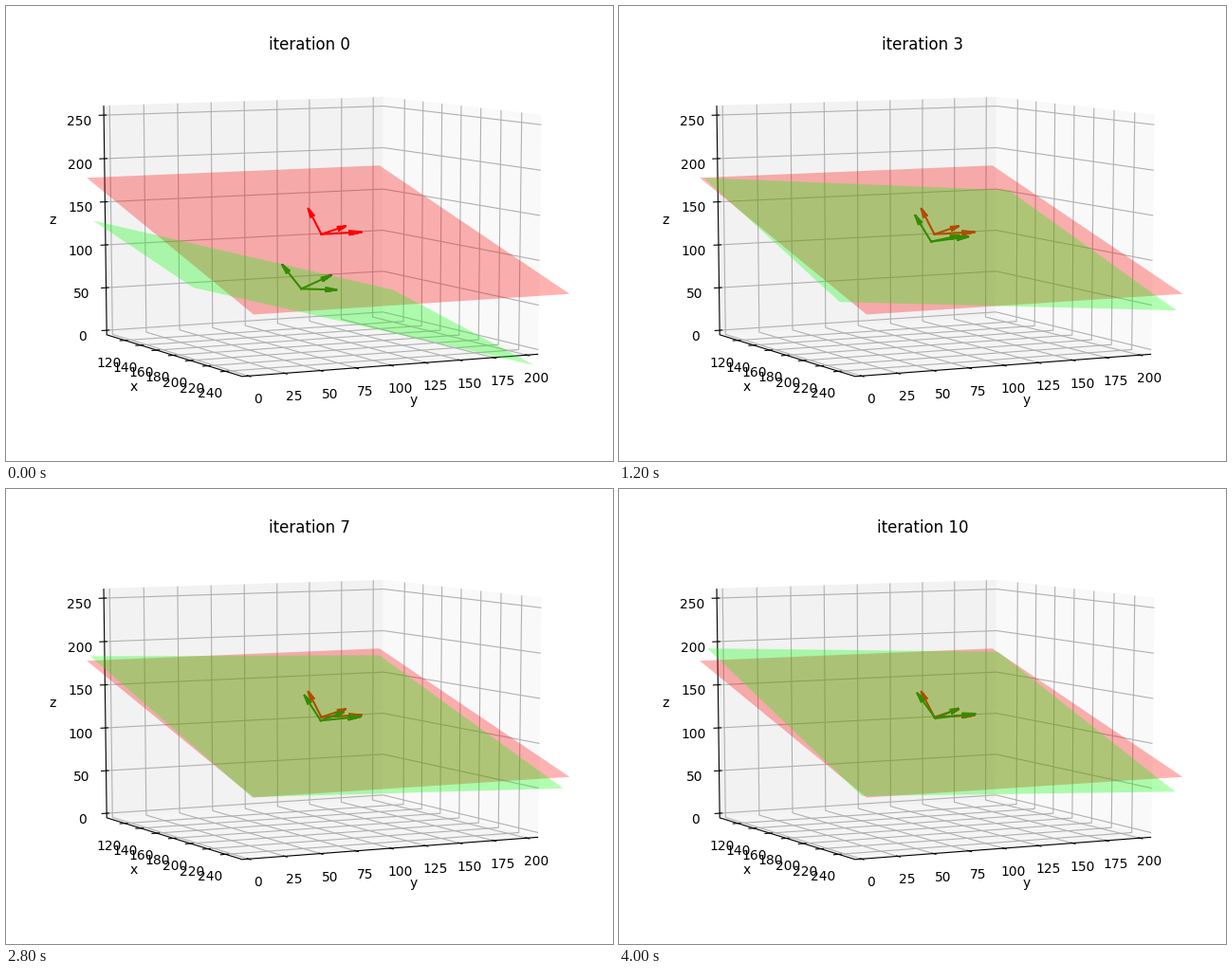
A matplotlib script for the animation above (4.4 s loop, 640 px wide and 480 px high).

```python
import numpy as np
import matplotlib.pyplot as plt
from matplotlib.animation import FuncAnimation

WIDTH, HEIGHT, DPI = 640, 480, 100
FRAMES, INTERVAL = 11, 400

AZIM, ELEV, DIST = np.radians(-27), np.radians(8), 10
CENTER, SCALE = np.array([328.3, 234.0]), np.array([326.5, -239.0])
LOW, HIGH = np.array([100, 0, 0]), np.array([255, 204, 255])
PAD = (HIGH - LOW) / 48
MIN, MAX = LOW - PAD, HIGH + PAD

SIDE, ARROW = 225, 30

# Centre x, y, z, then roll, pitch, yaw in degrees.
GOAL = [177, 105.3, 120.4, 0, -29, 0]
POSES = {
    0: [206.4, 71, 68.5, 22, -10.5, 11.5],
    1: [222.8, 79.7, 114.6, 22.5, -9.3, -1.5],
    2: [173.6, 89.1, 116.5, 21, -25, -2],
    3: [195.2, 90.7, 117.1, 5, -24.4, 4.6],
    6: [179, 103, 116.3, 4, -29.5, -1.5],
    10: [193, 95.3, 123.4, 5.7, -32.5, -1.5],
}


def project(point):
    """Perspective view of a data point, in stage pixels."""
    p = (np.asarray(point, float) - LOW) / (HIGH - LOW) - 0.5
    ca, sa, ce, se = np.cos(AZIM), np.sin(AZIM), np.cos(ELEV), np.sin(ELEV)
    right = np.array([-sa, ca, 0]) @ p
    up = np.array([-ca * se, -sa * se, ce]) @ p
    depth = np.array([ca * ce, sa * ce, se]) @ p
    return CENTER + SCALE * np.array([right, up]) / (1 - depth / DIST)


def project_all(points):
    return np.array([project(p) for p in points])


def rotation(roll, pitch, yaw):
    (ca, cb, cc), (sa, sb, sc) = (f(np.radians([roll, pitch, yaw]))
                                  for f in (np.cos, np.sin))
    rx = np.array([[1, 0, 0], [0, ca, -sa], [0, sa, ca]])
    ry = np.array([[cb, 0, sb], [0, 1, 0], [-sb, 0, cb]])
    rz = np.array([[cc, -sc, 0], [sc, cc, 0], [0, 0, 1]])
    return rz @ ry @ rx


def pose_at(iteration):
    columns = zip(*POSES.values())
    return [np.interp(iteration, list(POSES), column) for column in columns]


def arrow_path(base, tip):
    """Shaft and two barbs in one stroke."""
    along = tip - base
    normal = np.array([-along[1], along[0]]) / np.hypot(*along)
    neck = tip - 0.3 * along
    return np.array([base, tip, neck + 2 * normal, tip, neck - 2 * normal])


plt.rcParams["font.family"] = "DejaVu Sans"
fig = plt.figure(figsize=(WIDTH / DPI, HEIGHT / DPI), dpi=DPI, facecolor="white")
ax = fig.add_axes([0, 0, 1, 1])
ax.set_xlim(0, WIDTH)
ax.set_ylim(HEIGHT - 0.5, -0.5)
ax.axis("off")


def line3d(points, color, zorder):
    ax.plot(*project_all(points).T, color=color, lw=0.8, zorder=zorder)


def label(x, y, text, size=10):
    return ax.text(x, y, text, size=size, ha="center", va="baseline", zorder=4)


def draw_box():
    (x0, y0, z0), (x1, y1, z1) = MIN, MAX
    panes = [
        ([(x0, y0, z0), (x0, y1, z0), (x0, y1, z1), (x0, y0, z1)], "0.95"),
        ([(x0, y1, z0), (x1, y1, z0), (x1, y1, z1), (x0, y1, z1)], "0.975"),
        ([(x0, y0, z0), (x1, y0, z0), (x1, y1, z0), (x0, y1, z0)], "0.9625"),
    ]
    for corners, shade in panes:
        ax.fill(*project_all(corners).T, fc=shade, ec=shade, lw=1, zorder=1)

    line3d([(x0, y0, z1), (x0, y0, z0), (x1, y0, z0), (x1, y1, z0)], "black", 3)

    out_x, out_y = (HIGH - LOW)[:2] / 60
    axes = [
        (range(120, 241, 20), (-16.5, 28),
         lambda v: [(v, y1, z1), (v, y1, z0), (v, y0, z0)],
         np.array([0, -out_y, 0])),
        (range(0, 201, 25), (10, 29),
         lambda v: [(x0, v, z1), (x0, v, z0), (x1, v, z0)],
         np.array([out_x, 0, 0])),
        (range(0, 251, 50), (-26, 10.5),
         lambda v: [(x1, y1, v), (x0, y1, v), (x0, y0, v)],
         np.array([0, -out_y, 0])),
    ]
    for values, offset, grid, outward in axes:
        for value in values:
            path = grid(value)
            line3d(path, "#b0b0b0", 2)
            end = np.array(path[-1])
            line3d([end + outward, end - outward / 2], "black", 3)
            label(*(project(end) + offset), str(value))

    label(134.5, 406, "x")
    label(429.5, 419.5, "y")
    label(49, 229, "z")


class Plane:
    """Translucent square with the three axes of its frame beneath."""

    def __init__(self, face, stroke, zorder):
        self.face = ax.fill([0], [0], fc=face, ec="none", alpha=0.3,
                            zorder=zorder + 2)[0]
        self.arrows = [ax.plot([], [], color=stroke, lw=1.5, zorder=zorder)[0]
                       for _ in range(3)]

    def place(self, pose):
        center, turn = np.array(pose[:3]), rotation(*pose[3:])
        # The square lies along the rows of the rotation, the arrows along
        # its columns.
        a, b = turn[:2] * SIDE / 2
        self.face.set_xy(project_all(
            [center - a - b, center - a + b, center + a + b, center + a - b]))
        for arrow, axis in zip(self.arrows, turn.T):
            path = arrow_path(project(center), project(center + ARROW * axis))
            arrow.set_data(*path.T)


draw_box()
Plane("red", "red", 5).place(GOAL)
green = Plane("lime", "green", 6)
title = label(320, 46, "", size=12)


def update(iteration):
    green.place(pose_at(iteration))
    title.set_text(f"iteration {iteration}")
    return []


anim = FuncAnimation(fig, update, frames=FRAMES, interval=INTERVAL,
                     init_func=lambda: update(0), repeat=True, repeat_delay=0)
plt.show()
```
